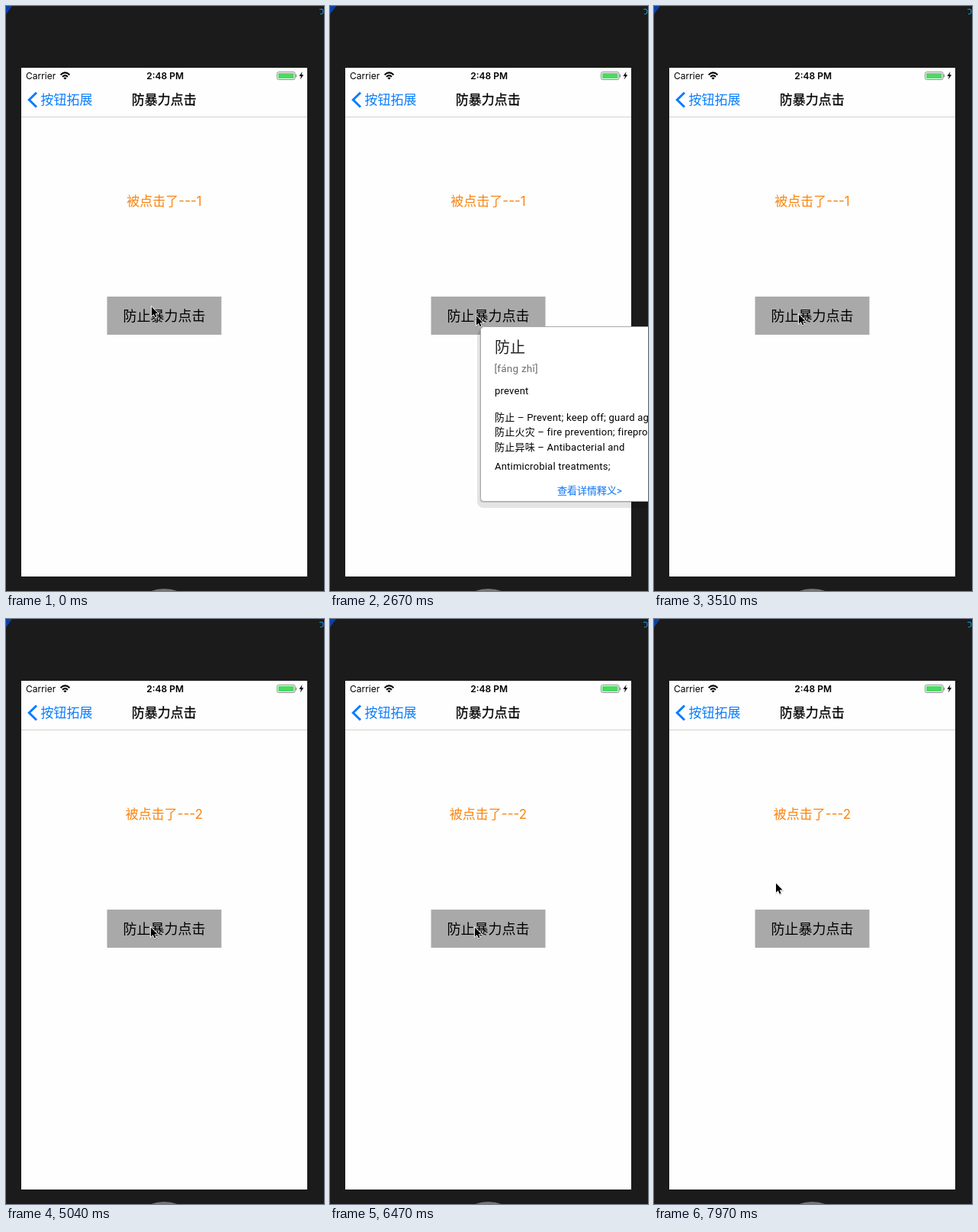
These frames come from a looping animation (417 by 767 pixels, 8 s). An HTML page:

```html
<!DOCTYPE html>
<html lang="zh-CN">
<head>
<meta charset="utf-8">
<title>防暴力点击</title>
<style>
  html, body { margin: 0; width: 100%; height: 100%; overflow: hidden; background: #1b1b1b; }
  svg { display: block; }
  text { font: 17px Inter, "Noto Sans CJK SC", sans-serif; white-space: pre; }
  .mid { text-anchor: middle; }
  .status { font-size: 12px; }
  .bold { font-weight: 600; }
  .title { stroke: #000; stroke-width: .3px; }
  #count { fill: #fc830c; }
  #label { font-size: 18px; }
  #popup text { font: 13px Roboto, "Noto Sans CJK SC", sans-serif; letter-spacing: .23px; }
  #popup .head { font-size: 20px; letter-spacing: 0; fill: #222; }
  #popup .pinyin { font-size: 13.5px; fill: #6e6e6e; }
  #popup .link { fill: #2080f7; letter-spacing: 0; stroke: #2080f7; stroke-width: .2px; }
</style>
</head>
<body>
<svg width="417" height="767" viewBox="0 0 417 767">
  <rect width="417" height="767" fill="#1b1b1b"/>
  <path d="M0 0H8L0 11Z" fill="#0b40a6"/>
  <path d="M411 4.5Q416 3 416 7T412 10.5" fill="none" stroke="#1a8fc0" stroke-width="1.2"/>
  <circle cx="207.5" cy="814" r="50" fill="#757575"/>

  <rect x="20" y="81" width="375" height="667" fill="#fefefe"/>
  <rect x="20" y="145" width="375" height="1" fill="#d2d2d2"/>

  <text class="status" x="26" y="95.5">Carrier</text>
  <g fill="none" stroke="#000" stroke-width="2">
    <path d="M71.6 90.2Q77.5 84.6 83.4 90.2"/>
    <path d="M74 92.8Q77.5 89.4 81 92.8"/>
  </g>
  <path d="M75.4 94.3Q77.5 92.5 79.6 94.3L77.5 96.6Z"/>
  <text class="status bold mid" x="208.7" y="95.5">2:48 PM</text>
  <rect x="355.5" y="86.5" width="23.5" height="10" rx="2" fill="none" stroke="#8c8c8c"/>
  <rect x="357" y="88" width="20.5" height="7" rx=".6" fill="#4cd964"/>
  <path d="M380 89.5q1.5 2 0 4Z" fill="#777" stroke="#777" stroke-width=".5"/>
  <path d="M388.6 86L384.4 92H387L385.8 96.5L390.2 90.3H387.5Z"/>

  <path d="M40 113.5L30.3 123L40 132.5" fill="none" stroke="#087cff" stroke-width="3"/>
  <text x="45.5" y="129.3" fill="#087cff">按钮拓展</text>
  <text class="mid title" x="207.3" y="129.3">防暴力点击</text>

  <text class="mid" id="count" x="207.5" y="262.3"></text>
  <rect x="132.5" y="381" width="150" height="50" fill="#a9a9a9"/>
  <text class="mid" id="label" x="207.5" y="412.8">防止暴力点击</text>

  <g id="popup">
    <rect x="193" y="424" width="260" height="234" rx="8" opacity=".1"/>
    <rect x="196.5" y="421" width="260" height="230" rx="4" opacity=".15"/>
    <rect x="197.5" y="420.5" width="260" height="229" rx="4" fill="#fff" stroke="#a8a8a8"/>
    <text class="head" x="216" y="455">防止</text>
    <text class="pinyin" x="215.5" y="480">[fáng zhǐ]</text>
    <text x="216" y="509">prevent</text>
    <text x="216" y="544">防止 – Prevent; keep off; guard against</text>
    <text x="216" y="563.3">防止火灾 – fire prevention; fireproofing</text>
    <text x="216" y="582.5">防止异味 – Antibacterial and</text>
    <text x="216" y="607.5">Antimicrobial treatments;</text>
    <text class="link" x="298" y="639.5">查看详情释义&gt;</text>
  </g>

  <g id="cursor">
    <path d="M1 2.5V14.8L4 12L6 16.5L8 15.6L6.1 11.6H10Z" opacity=".18" stroke="#000" stroke-width="1.5"/>
    <path d="M1 1.5V13.6L3.8 11L5.8 15.4L7.5 14.6L5.7 10.3H9.5Z" stroke="#fff" stroke-width="1.6" paint-order="stroke"/>
  </g>
</svg>
<script>
const LOOP = 8000, CLICK = 70;
const $ = id => document.getElementById(id);
const count = $('count'), label = $('label'), popup = $('popup'), cursor = $('cursor');

const home = { x: 190, y: 393 };
const glides = [
  { from: 1400, to: 1490, x: 190, y: 404 },
  { from: 2270, to: 2430, x: 201, y: 415 },
  { from: 2630, to: 2730, x: 189, y: 403 },
  { from: 7960, to: 7970, x: 159, y: 345 }
];

// Each burst flips the button between pressed and released every CLICK ms.
const bursts = [
  { from: 5040, flips: 18 },
  { from: 6470, flips: 6 },
  { from: 7020, flips: 8 },
  { from: 7670, flips: 3 }
];

const clamp = (v, lo, hi) => Math.min(hi, Math.max(lo, v));
const easeOut = p => 1 - (1 - p) ** 3;

function cursorAt(t) {
  let { x, y } = home;
  for (const g of glides) {
    const k = easeOut(clamp((t - g.from) / (g.to - g.from), 0, 1));
    x += (g.x - x) * k;
    y += (g.y - y) * k;
  }
  return [Math.round(x), Math.round(y)];
}

const flipsAt = t => bursts.reduce(
  (sum, b) => sum + clamp(Math.floor((t - b.from) / CLICK) + 1, 0, b.flips), 0);

function draw(t) {
  cursor.setAttribute('transform', `translate(${cursorAt(t)})`);

  const shown = t >= 2140 && t < 3510;
  popup.setAttribute('opacity', shown ? (t < 3420 ? 1 : .5) : 0);
  popup.setAttribute('transform', t < 2790 ? '' : 'translate(-2 -1)');

  const flips = flipsAt(t);
  label.setAttribute('fill', flips && flips % 2 === 0 ? '#fff' : '#000');
  count.textContent = '被点击了---' + (flips ? 2 : 1);
}

const start = performance.now();
function tick() {
  draw((performance.now() - start) % LOOP);
  requestAnimationFrame(tick);
}
tick();
</script>
</body>
</html>
```
